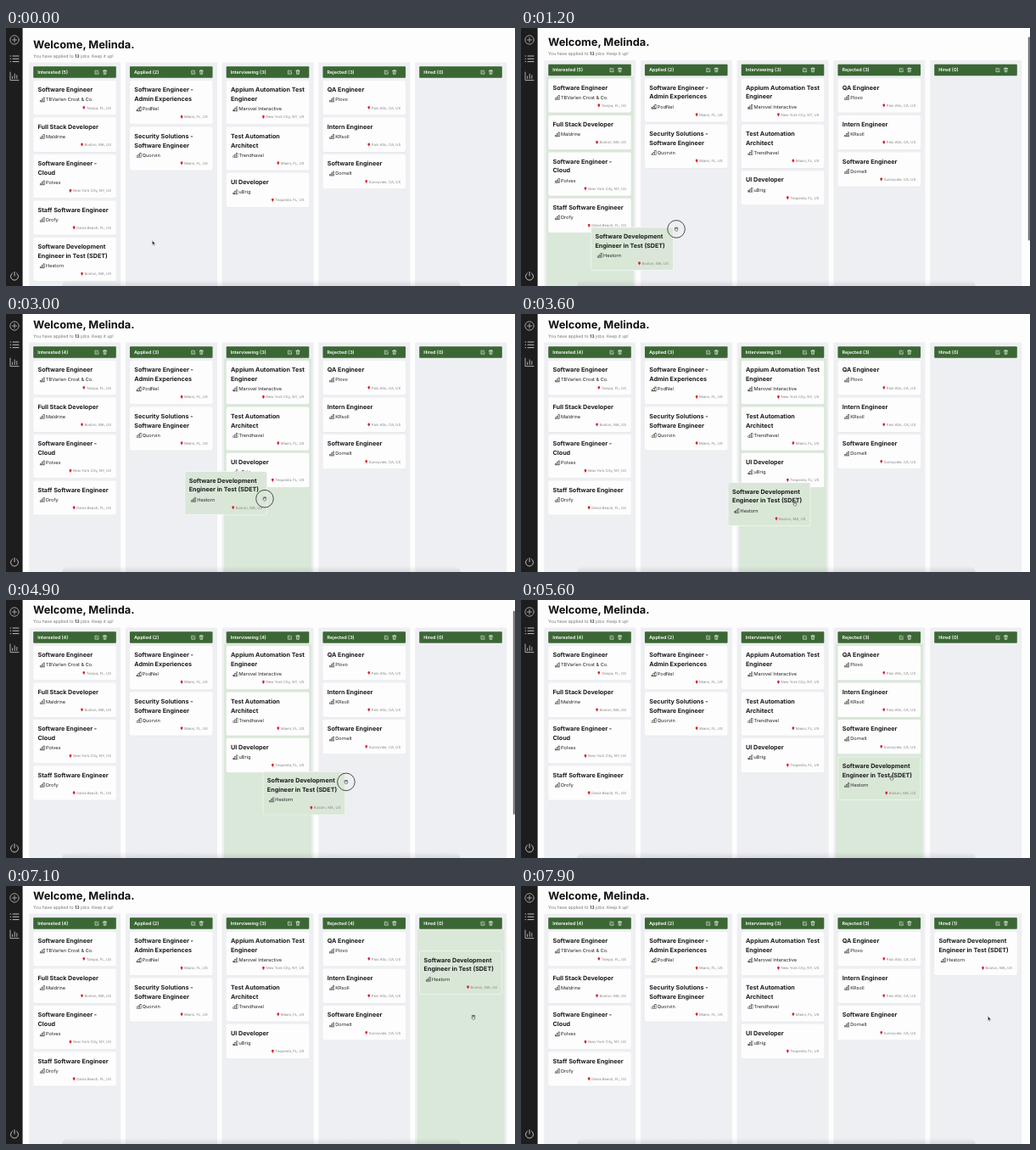
An HTML page with a canvas that plays this animation: 600 px wide and 304 px high, repeating every 8 s.

```html
<!DOCTYPE html>
<html lang="en">
<head>
<meta charset="utf-8">
<title>Job board</title>
<style>
  html, body { margin: 0; width: 100%; height: 100%; overflow: hidden; background: #fdfdfd; }
  canvas { display: block; width: 600px; height: 304px; }
</style>
</head>
<body>
<canvas id="stage"></canvas>
<script>
const W = 600, H = 304, LOOP = 8000, STEP = 100;
const canvas = document.getElementById('stage');
const ctx = canvas.getContext('2d');
const ratio = window.devicePixelRatio || 1;
canvas.width = W * ratio;
canvas.height = H * ratio;

const PAPER = '#fdfdfd', COLUMN = '#eeeff2', GREEN = '#3b6734', PALE = '#dae8d9', INK = '#1c1c1e';
const CARD_W = 97.6, CARD_H = 40.4, LIST_TOP = 62, LINE = 10.9, GAP = 3.1;
const colX = i => 32.2 + i * 113.75;

const job = (title, company, place) => ({ lines: title.split('|'), company, place });
const columns = [
  { name: 'Interested', jobs: [
    job('Software Engineer', 'TBVarlen Crost & Co.', 'Tampa, FL, US'),
    job('Full Stack Developer', 'Maldrine', 'Boston, MA, US'),
    job('Software Engineer -|Cloud', 'Polvex', 'New York City, NY, US'),
    job('Staff Software Engineer', 'Drofy', 'Dania Beach, FL, US')] },
  { name: 'Applied', jobs: [
    job('Software Engineer -|Admin Experiences', 'PodNel', 'Miami, FL, US'),
    job('Security Solutions -|Software Engineer', 'Quorvin', 'Miami, FL, US')] },
  { name: 'Interviewing', jobs: [
    job('Appium Automation Test|Engineer', 'Marovel Interactive', 'New York City, NY, US'),
    job('Test Automation|Architect', 'Trendhavel', 'Miami, FL, US'),
    job('UI Developer', 'uBrig', 'Tequesta, FL, US')] },
  { name: 'Rejected', jobs: [
    job('QA Engineer', 'Plovo', 'Palo Alto, CA, US'),
    job('Intern Engineer', 'KRsoll', 'Palo Alto, CA, US'),
    job('Software Engineer', 'Dornelt', 'Sunnyvale, CA, US')] },
  { name: 'Hired', jobs: [] }
];
const mover = job('Software Development|Engineer in Test (SDET)', 'Hestorn', 'Boston, MA, US');

// The pointer hops from rest to rest; every hop after the first drags the card,
// which trails the pointer by `lag` and glides into its list from drop to end.
const rest = { x: 173, y: 252 };
const hops = [
  { x: 117, y: 257, start: 100, span: 700 },
  { x: 234, y: 194, start: 996, span: 600, bend: 15.8, lag: 58, press: 900, drop: 1600, end: 1900 },
  { x: 323, y: 223.7, start: 2560, span: 800, lag: 60, press: 2560, drop: 3545, end: 3950 },
  { x: 437, y: 210, start: 4725, span: 400, lag: 91, press: 4600, drop: 5300, end: 5700 },
  { x: 551, y: 155, start: 6454, span: 400, bend: 7.3, lag: 51, press: 6300, drop: 6950, end: 7400 }
];
const drags = hops.slice(1);

const ramp = (t, a, b) => Math.min(1, Math.max(0, (t - a) / (b - a)));
const easeOut = (u, power) => 1 - (1 - u) ** power;
const scrollAt = t => 7 * ramp(t, 900, 1700) + ramp(t, 4700, 4900);

function shift(hop, t) {
  const from = hops[hops.indexOf(hop) - 1] || rest;
  const u = easeOut(ramp(t, hop.start, hop.start + hop.span), 2);
  return {
    x: (hop.x - from.x) * u,
    y: (hop.y - from.y) * u + (hop.bend || 0) * Math.sin(Math.PI * u)
  };
}

function pointerAt(t) {
  return hops.reduce((p, hop) => {
    const d = shift(hop, t);
    return { x: p.x + d.x, y: p.y + d.y };
  }, rest);
}

const cardHeight = j => CARD_H + (j.lines.length - 1) * LINE;
const listEnd = i => columns[i].jobs.reduce((y, j) => y + cardHeight(j) + GAP, LIST_TOP);

function heldCard(drag, home, t) {
  const d = shift(drag, t - drag.lag);
  const x = colX(home) + d.x, y = listEnd(home) - scrollAt(drag.start) + d.y;
  const u = easeOut(ramp(t, drag.drop, drag.end), 3);
  return {
    x: x + (colX(home + 1) - x) * u,
    y: y + (listEnd(home + 1) - scrollAt(t) - y) * u
  };
}

function box(x, y, w, h, r, fill) {
  ctx.beginPath();
  ctx.roundRect(x, y, w, h, r);
  ctx.fillStyle = fill;
  ctx.fill();
}

function text(s, x, y, size, weight, color, align = 'left') {
  ctx.font = `${weight} ${size}px Inter, sans-serif`;
  ctx.textAlign = align;
  ctx.fillStyle = color;
  ctx.fillText(s, x, y);
  return ctx.measureText(s).width;
}

function stroke(d, x, y, color, width, fill) {
  const p = new Path2D(d);
  ctx.save();
  ctx.translate(x, y);
  ctx.lineCap = ctx.lineJoin = 'round';
  if (fill) { ctx.fillStyle = fill; ctx.fill(p); }
  ctx.strokeStyle = color;
  ctx.lineWidth = width;
  ctx.stroke(p);
  ctx.restore();
}

function pin(x, y) {
  ctx.beginPath();
  ctx.arc(x, y - .5, 1.4, Math.PI * .85, Math.PI * 2.15);
  ctx.lineTo(x, y + 2.2);
  ctx.closePath();
  ctx.fillStyle = '#d8222f';
  ctx.fill();
}

function card(j, x, y, held) {
  const h = cardHeight(j), extra = h - CARD_H;
  if (held) {
    box(x, y, CARD_W, h, 2, 'rgba(246,250,246,.9)');
    box(x + .7, y + .7, CARD_W - 1.4, h - 1.4, 1.5, 'rgba(217,231,215,.96)');
  } else {
    box(x, y + .5, CARD_W, h, 2, 'rgba(0,0,0,.05)');
    box(x, y, CARD_W, h, 2, PAPER);
  }
  j.lines.forEach((s, i) => text(s, x + 5.3, y + 13.2 + i * LINE, 7.18, 700, INK));
  for (let i = 0; i < 3; i++) {
    ctx.strokeStyle = '#555';
    ctx.lineWidth = .6;
    ctx.strokeRect(x + 8 + i * 1.9, y + 23.4 + extra - i * 1.7, 1.5, 1.6 + i * 1.7);
  }
  text(j.company, x + 14.8, y + 24.4 + extra, 5.6, 400, '#222');
  const w = text(j.place, x + 91.8, y + 33.5 + extra, 4.25, 400, '#858585', 'right');
  pin(x + 88.8 - w, y + 31.9 + extra);
}

function column(i, count, lit) {
  const x = colX(i), c = columns[i];
  box(x - 5, 40.5, 108, 300, 1, COLUMN);
  if (lit) box(x - 2.5, 59.5, 103, 280, 0, PALE);
  box(x, 45.3, CARD_W, 13.5, 1, GREEN);
  text(`${c.name} (${count})`, x + 5, 54, 5.5, 600, '#fff');
  stroke('M2.4 .3H0V4.3H4V2.3M1.8 2.6L4.2 .2', x + 72.8, 49.9, '#fff', .6);
  stroke('M0 .7H4.2M1.4 .6V0H2.8V.6M.5 .9L.8 4.8H3.4L3.7 .9M2.1 1.9V3.8', x + 82.2, 49.6, '#fff', .6);
  let y = LIST_TOP;
  for (const j of c.jobs) {
    card(j, x, y);
    y += cardHeight(j) + GAP;
  }
}

function sidebar() {
  box(0, 0, 19.6, H, 0, '#1d1d1e');
  const c = '#bdbdbd';
  stroke('M5.2 0A5.2 5.2 0 1 1 -5.2 0A5.2 5.2 0 1 1 5.2 0M-2.6 0H2.6M0 -2.6V2.6', 10, 14, c, .8);
  for (let y = 33; y < 41; y += 3.3) stroke('M-2 0H5M-4.9 0H-4.4', 10, y, c, 1);
  stroke('M-5 -5V4.6H5M-2.4 2.6V0M.2 2.6V-3M2.8 2.6V-1.4', 10, 57, c, .9);
  stroke('M-2.4 -3.6A4.5 4.5 0 1 0 2.4 -3.6M0 -5V-.4', 10, 292.4, c, 1);
}

function bottomShade() {
  const g = ctx.createLinearGradient(0, 297, 0, H);
  g.addColorStop(0, 'rgba(0,0,0,0)');
  g.addColorStop(1, 'rgba(0,0,0,.09)');
  box(66, 297, 470, 20, 8, g);
}

function scrollbar(t, scroll) {
  const shown = [[1000, 2200], [4800, 5600]].find(([a, b]) => t >= a && t < b);
  if (shown) {
    ctx.globalAlpha = 1 - ramp(t, shown[1] - 200, shown[1]);
    box(597.8, 9.5 + scroll * .4, 2, 240, 1, '#6c6c6c');
    ctx.globalAlpha = 1;
  }
}

function pointer(t) {
  const { x, y } = pointerAt(t);
  const pressed = drags.some(d => t >= d.press && t < d.drop);
  if (pressed) {
    ctx.beginPath();
    ctx.arc(x, y, 10.3, 0, Math.PI * 2);
    ctx.strokeStyle = '#3c3c3c';
    ctx.lineWidth = .9;
    ctx.stroke();
  }
  if (t < 500 || t >= 7400) {
    const arrow = 'M0 0V4.6L1.1 3.7L1.9 5.4L2.7 5L1.9 3.4H3.3z';
    stroke(arrow, x - .6, y - 1.2, '#fff', .8, '#000');
    stroke(arrow, x - .6, y - 1.2, '#000', .2);
  } else {
    const reach = pressed ? -1.6 : -2.5;
    stroke(`M-1.7 0V${reach}H1.7V1Q1.5 2.4 0 2.4Q-1.4 2.2 -1.9 .6zM-.6 ${reach}V-.4M.6 ${reach}V-.4`,
      x, y, '#333', .6, '#fff');
  }
}

function draw(t) {
  ctx.setTransform(ratio, 0, 0, ratio, 0, 0);
  ctx.textRendering = 'geometricPrecision';
  ctx.fillStyle = PAPER;
  ctx.fillRect(0, 0, W, H);

  const scroll = scrollAt(t);
  const home = drags.filter(d => t >= d.end).length;
  const drag = drags.find(d => t >= d.start && t < d.end);
  const held = drag && heldCard(drag, home, t);
  const crossed = held && held.x + CARD_W / 2 > colX(home) + 105;
  const lit = held ? home + (crossed ? 1 : 0) : -1;

  ctx.save();
  ctx.translate(0, -scroll);
  text('Welcome, Melinda.', 32, 24, 12.8, 700, '#111');
  let x = 32;
  x += text('You have applied to ', x, 35.1, 5.14, 400, '#777');
  x += text('13', x, 35.1, 5.14, 700, '#444');
  text(' jobs. Keep it up!', x, 35.1, 5.14, 400, '#777');
  columns.forEach((c, i) => column(i, c.jobs.length + (i === home ? 1 : 0), i === lit));
  if (!held) card(mover, colX(home), listEnd(home));
  ctx.restore();

  if (held) card(mover, held.x, held.y, true);
  bottomShade();
  sidebar();
  scrollbar(t, scroll);
  pointer(t);
}

const start = performance.now();
function tick() {
  const t = (performance.now() - start) % LOOP;
  draw(Math.floor(t / STEP) * STEP);
  requestAnimationFrame(tick);
}
tick();
</script>
</body>
</html>
```
